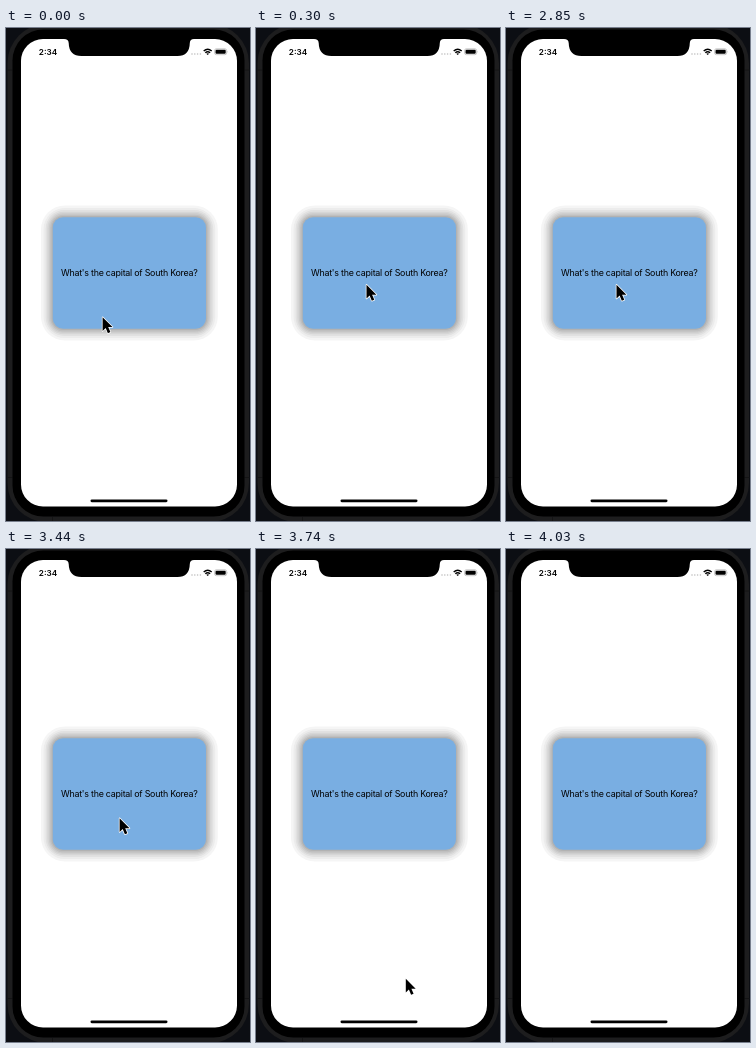
An HTML page for the animation above (4.48 s loop, 244 by 493 pixels).

```html
<!DOCTYPE html>
<html lang="en">
<head>
<meta charset="utf-8">
<title>Flash card</title>
<style>
  html, body { margin: 0; width: 100%; height: 100%; overflow: hidden; background: #0c0e13; }
  svg { display: block; width: 100vw; height: 100vh; }
  text { font-family: Inter, "Liberation Sans", sans-serif; text-anchor: middle; }
  .label { font-size: 8.87px; letter-spacing: -0.23px; }
  .clock { font-size: 8.2px; font-weight: 600; }
</style>
</head>
<body>
<svg viewBox="0 0 244 493" xmlns="http://www.w3.org/2000/svg">
  <!-- phone body -->
  <rect width="244" height="493" fill="#0c0e13"/>
  <rect x="1.5" y="-4" width="241.5" height="498" rx="39" fill="#1d1d1e"/>
  <path d="M1.5 42h5M1.5 449.500h5M238.500 42h5M238.500 449.500h5M46.500 489v4" stroke="#141415"/>
  <rect x="6.500" y="1.500" width="232" height="487" rx="31" fill="#000"/>
  <rect x="15" y="11" width="216" height="467.500" rx="22" fill="#fff"/>
  <path d="M58 10.500V11Q62.500 11 62.700 15Q63 28 75.500 28H171.500Q183.500 28 183.800 15Q184 11 188 11V10.500Z" fill="#000"/>
  <rect x="84.500" y="471.500" width="77" height="2.700" rx="1.350" fill="#000"/>

  <!-- status bar -->
  <text class="clock" x="42" y="27">2:34</text>
  <g fill="#bdbdbd">
    <circle cx="186" cy="26" r=".8"/><circle cx="188.800" cy="26" r=".8"/>
    <circle cx="191.600" cy="26" r=".8"/><circle cx="194.400" cy="26" r=".8"/>
  </g>
  <g fill="none" stroke="#000" stroke-width="1.400">
    <path d="M197.700 23.100Q201.700 19.300 205.700 23.100M199.300 24.800Q201.700 22.500 204.100 24.800"/>
  </g>
  <path d="M200.300 25.700Q201.700 24.600 203.100 25.700L201.700 27.100Z"/>
  <rect x="208.600" y="20.800" width="12" height="5.900" rx="1.700" fill="none" stroke="#a6a6a6" stroke-width=".6"/>
  <rect x="209.500" y="21.700" width="10.200" height="4.100" rx="1"/>
  <path d="M221.400 22.700q.9 1 0 2.100z" fill="#a6a6a6"/>

  <!-- card -->
  <g id="shadow"></g>
  <rect id="card" x="46.800" y="189.300" width="153.200" height="111.500" rx="10.400"/>
  <text id="label" class="label" x="123.300" y="248.200"></text>

  <!-- pointer, origin at its top left -->
  <path id="pointer" d="M1 1V14.700L4.100 11.800L6.300 17L8.800 15.900L6.600 10.900H10.900Z"
    fill="#000" stroke="#fff" stroke-width="1.500" stroke-linejoin="round" paint-order="stroke"/>
</svg>
<script>
const LOOP = 4480;
const $ = id => document.getElementById(id);
const front = { fill: '#79aee2', ink: '#000', text: "What's the capital of South Korea?" };
const back = { fill: '#0074e4', ink: '#fff', text: 'Seoul' };

// start time, x, y of each resting place
const stops = [
  [0, 95.6, 288.2], [150, 106.2, 263], [300, 109.5, 255.8], [3440, 112.6, 268.3],
  [3590, 137, 353.5], [3740, 148.8, 428.8], [3880, 145, 477]
];
const leaveAt = 4030;

// soft shadow in stepped bands: spread, grey
const bands = [
  [11.8, 245], [9.2, 236], [7.2, 225], [5.5, 214], [4, 203], [2.6, 191], [1.2, 178]
];
$('shadow').innerHTML = bands.map(([s, g]) =>
  `<rect x="${46.8 - s}" y="${189.3 - s}" width="${153.2 + 2 * s}" height="${111.5 + 2 * s}"
    rx="${10.4 + s * 1.15}" fill="rgb(${g},${g},${g})"/>`).join('');

let shown = null;
function showSide(side) {
  if (side === shown) return;
  shown = side;
  $('card').setAttribute('fill', side.fill);
  $('label').setAttribute('fill', side.ink);
  $('label').textContent = side.text;
}

function draw(t) {
  showSide(t >= 1500 && t < 2850 ? back : front);
  const [, x, y] = stops.filter(s => s[0] <= t).pop();
  $('pointer').setAttribute('transform', `translate(${x} ${y})`);
  $('pointer').setAttribute('visibility', t < leaveAt ? 'visible' : 'hidden');
}

const start = performance.now();
function tick() {
  draw((performance.now() - start) % LOOP);
  requestAnimationFrame(tick);
}
tick();
</script>
</body>
</html>
```
